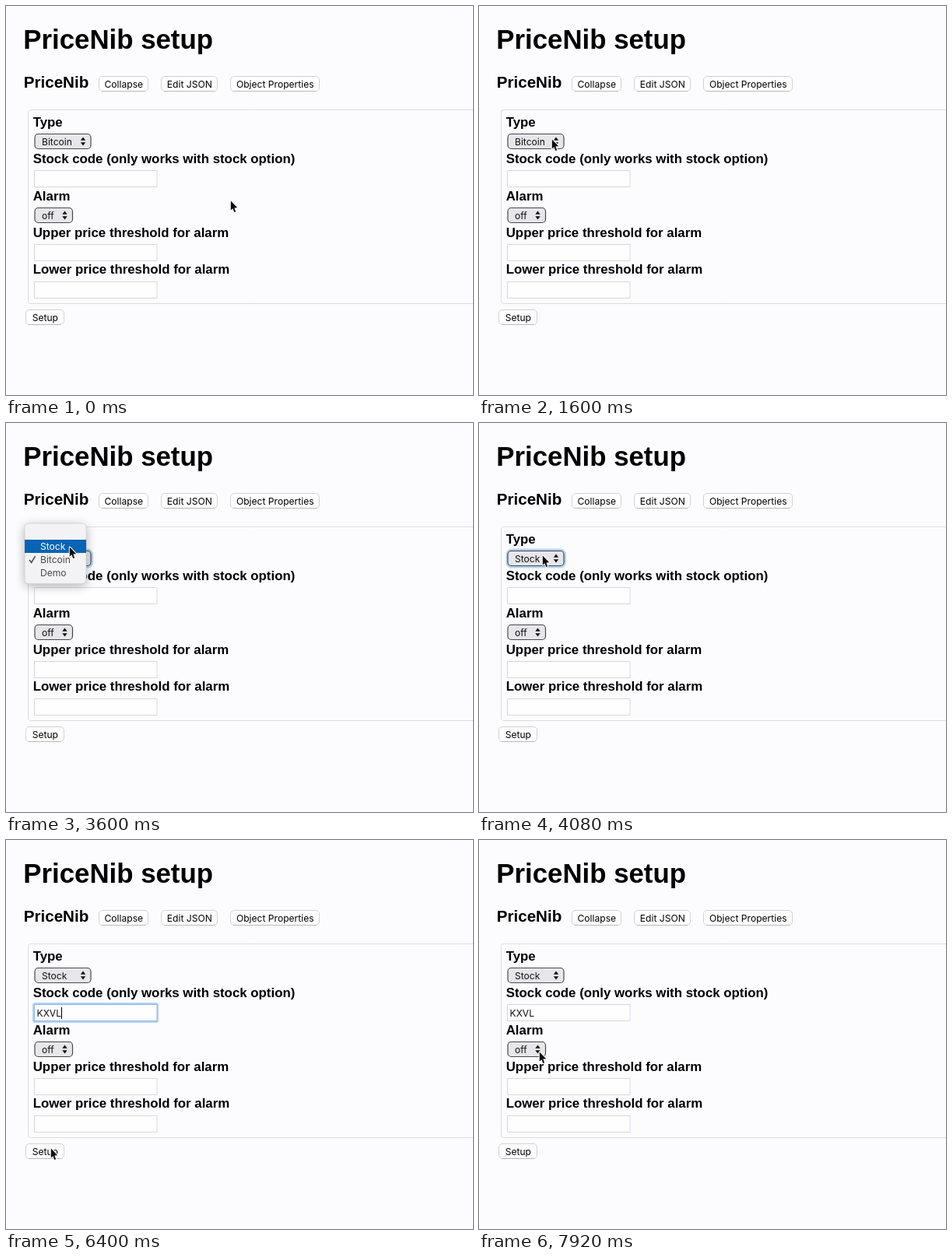
Animation of 600x500 px, one loop 8000 ms. Source, as an HTML page with a canvas:

```html
<!DOCTYPE html>
<html lang="en">
<head>
<meta charset="utf-8">
<title>Setup form</title>
<style>
html, body { margin: 0; width: 100%; height: 100%; overflow: hidden; background: #fcfcff; }
canvas { display: block; }
</style>
</head>
<body>
<canvas id="stage" width="600" height="500"></canvas>
<script>
const ctx = document.getElementById('stage').getContext('2d');
const LOOP = 8000, STEP = 80;
const BOLD = '"Liberation Sans", Arial, sans-serif';
const UI = '12.1px Inter, Roboto, sans-serif';
const BG = '#fcfcff', EDGE = '#dcdce3', DARK = '#48484c';
const APP = 'PriceNib', CODE = 'KXVL';

const MENU_OPEN = 2720, PICK = 3680, MENU_GONE = 3840;
const FOCUS = 4480, BLUR = 7360;
const KEYS = [5040, 5140, 5240, 5380];

// Pointer stops: time, x, y
const PATH = [
  [0, 288, 250], [560, 288, 250], [1440, 93, 171], [2400, 93, 171],
  [2720, 87, 174], [2960, 87, 174], [3360, 81, 159], [3760, 81, 159],
  [4000, 81, 170], [4160, 81, 170], [4480, 98, 216], [5760, 98, 216],
  [6400, 57, 396], [6640, 57, 396], [7200, 416, 409], [7360, 416, 409],
  [7840, 77, 272], [8000, 77, 272]
];

function pointer(t) {
  let i = 1;
  while (i < PATH.length - 1 && t > PATH[i][0]) i++;
  const [t0, x0, y0] = PATH[i - 1], [t1, x1, y1] = PATH[i];
  const u = (t - t0) / (t1 - t0), e = u * u * (3 - 2 * u);
  return { x: x0 + (x1 - x0) * e, y: y0 + (y1 - y0) * e };
}

function box(x, y, w, h, r, fill, stroke, line = 1) {
  ctx.beginPath();
  ctx.roundRect(x, y, w, h, r);
  if (fill) { ctx.fillStyle = fill; ctx.fill(); }
  if (stroke) { ctx.strokeStyle = stroke; ctx.lineWidth = line; ctx.stroke(); }
}

function text(str, x, y, color = '#111', align = 'left') {
  ctx.font = UI;
  ctx.textAlign = align;
  ctx.fillStyle = color;
  ctx.fillText(str, x, y);
}

function heading(str, x, y, size) {
  ctx.font = `bold ${size}px ${BOLD}`;
  ctx.textAlign = 'left';
  ctx.fillStyle = '#000';
  ctx.fillText(str, x, y);
}

function poly(points, fill) {
  ctx.beginPath();
  for (const [x, y] of points) ctx.lineTo(x, y);
  ctx.closePath();
  ctx.fillStyle = fill;
  ctx.fill();
}

function button(label, x, y, w) {
  box(x + .5, y + .5, w - 1, 19, 4.5, '#fefeff', '#d2d2d6');
  ctx.fillStyle = '#b9b9be';
  ctx.fillRect(x + 4, y + 19, w - 8, 1);
  text(label, x + w / 2 + .3, y + 14.8, '#000', 'center');
}

function focusRing(x, y, w, h, r) {
  box(x - 1, y - 1, w + 2, h + 2, r + 1, null, '#b2d3f6', 3);
}

function select(label, y, w, focused) {
  if (focused) focusRing(37, y, w, 20, 5);
  box(37, y + .5, w - .5, 19, 4.5, '#e7e7eb', DARK, 1.2);
  text(label, 46, y + 14.5);
  const c = 37 + w - 10.5, m = y + 10;
  poly([[c - 3.2, m - 1.3], [c, m - 5.5], [c + 3.2, m - 1.3]], '#111');
  poly([[c - 3.2, m + 1.3], [c, m + 5.5], [c + 3.2, m + 1.3]], '#111');
}

function input(y, value = '', focused = false, caret = false) {
  if (focused) focusRing(36.5, y + .5, 157, 21, 1);
  box(36.5, y + .5, 157.5, 21, 0, '#fefeff', focused ? '#8eb5df' : '#d6d6e0');
  text(value, 39.5, y + 16);
  if (caret) {
    ctx.font = UI;
    const x = Math.round(39 + ctx.measureText(value).width);
    ctx.fillStyle = '#000';
    ctx.fillRect(x, y + 4, 1, 15);
  }
}

function menu(t, p) {
  if (t < MENU_OPEN || t >= MENU_GONE) return;
  ctx.save();
  ctx.globalAlpha = t < PICK + STEP ? 1 : .45;
  ctx.shadowColor = 'rgba(0,0,0,.3)';
  ctx.shadowBlur = 13;
  ctx.shadowOffsetY = 3;
  box(24, 129, 79, 77.5, 5, '#f3f3f5');
  ctx.shadowColor = 'transparent';
  box(24, 129, 79, 77.5, 5, null, '#d0d0d4', .8);
  const hover = p.y < 167 ? 0 : p.y < 184 ? 1 : 2;
  ['Stock', 'Bitcoin', 'Demo'].forEach((name, i) => {
    const y = 150 + i * 17, on = i === hover, color = on ? '#fff' : '#4a4a4c';
    if (on) { ctx.fillStyle = '#0864b4'; ctx.fillRect(24, y, 79, 17); }
    text(name, 44, y + 12.8, color);
    if (i === 1) {
      ctx.beginPath();
      ctx.moveTo(30, y + 9);
      ctx.lineTo(32.7, y + 12.3);
      ctx.lineTo(37.5, y + 4.2);
      ctx.strokeStyle = color;
      ctx.lineWidth = 1.6;
      ctx.stroke();
    }
  });
  ctx.restore();
}

function arrow(x, y) {
  ctx.save();
  ctx.translate(x, y);
  ctx.beginPath();
  for (const [a, b] of [[.8, .5], [.8, 12.6], [3.4, 10.2], [5.3, 15], [7.2, 14.2], [5.3, 9.5], [9.2, 9.3]]) ctx.lineTo(a, b);
  ctx.closePath();
  ctx.lineJoin = 'round';
  ctx.lineWidth = 2;
  ctx.strokeStyle = '#fff';
  ctx.stroke();
  ctx.fillStyle = '#0a0a0a';
  ctx.fill();
  ctx.restore();
}

function beam(x, y) {
  x = Math.round(x) + .5;
  y = Math.round(y);
  ctx.beginPath();
  for (const s of [-1, 1]) {
    ctx.moveTo(x - 3, y + 7.5 * s);
    ctx.quadraticCurveTo(x, y + 7.5 * s, x, y + 5 * s);
    ctx.quadraticCurveTo(x, y + 7.5 * s, x + 3, y + 7.5 * s);
  }
  ctx.moveTo(x, y - 6);
  ctx.lineTo(x, y + 6);
  ctx.moveTo(x - 2, y + 3);
  ctx.lineTo(x + 2, y + 3);
  ctx.strokeStyle = '#222';
  ctx.lineWidth = 1;
  ctx.stroke();
}

function draw(t) {
  const p = pointer(t);
  ctx.fillStyle = BG;
  ctx.fillRect(0, 0, 600, 500);

  heading(APP + ' setup', 22.3, 55, 34.8);
  heading(APP, 22.7, 105, 20.6);
  button('Collapse', 119, 90, 64);
  button('Edit JSON', 199, 90, 73);
  button('Object Properties', 288, 90, 115);

  box(28.5, 133.5, 640, 249, 3, null, EDGE);
  ['Type', 'Stock code (only works with stock option)', 'Alarm',
    'Upper price threshold for alarm', 'Lower price threshold for alarm']
    .forEach((label, i) => heading(label, 34.7, 154.8 + i * 47.4, 16.84));

  select(t < PICK ? 'Bitcoin' : 'Stock', 164, 72.5, t >= MENU_OPEN && t < FOCUS);
  const typed = KEYS.filter(k => t >= k).length;
  const focused = t >= FOCUS && t < BLUR;
  const since = t - (typed ? KEYS[typed - 1] : FOCUS);
  input(211, CODE.slice(0, typed), focused, focused && since % 1000 < 500);
  select('off', 259, 49, false);
  input(306);
  input(354);
  button('Setup', 25, 390, 50);

  menu(t, p);
  const overField = p.x > 36 && p.x < 194 && p.y > 211 && p.y < 233;
  (overField ? beam : arrow)(p.x, p.y);
}

function tick() {
  const t = performance.now() % LOOP;
  draw(Math.floor(t / STEP) * STEP);
  requestAnimationFrame(tick);
}
tick();
</script>
</body>
</html>
```
